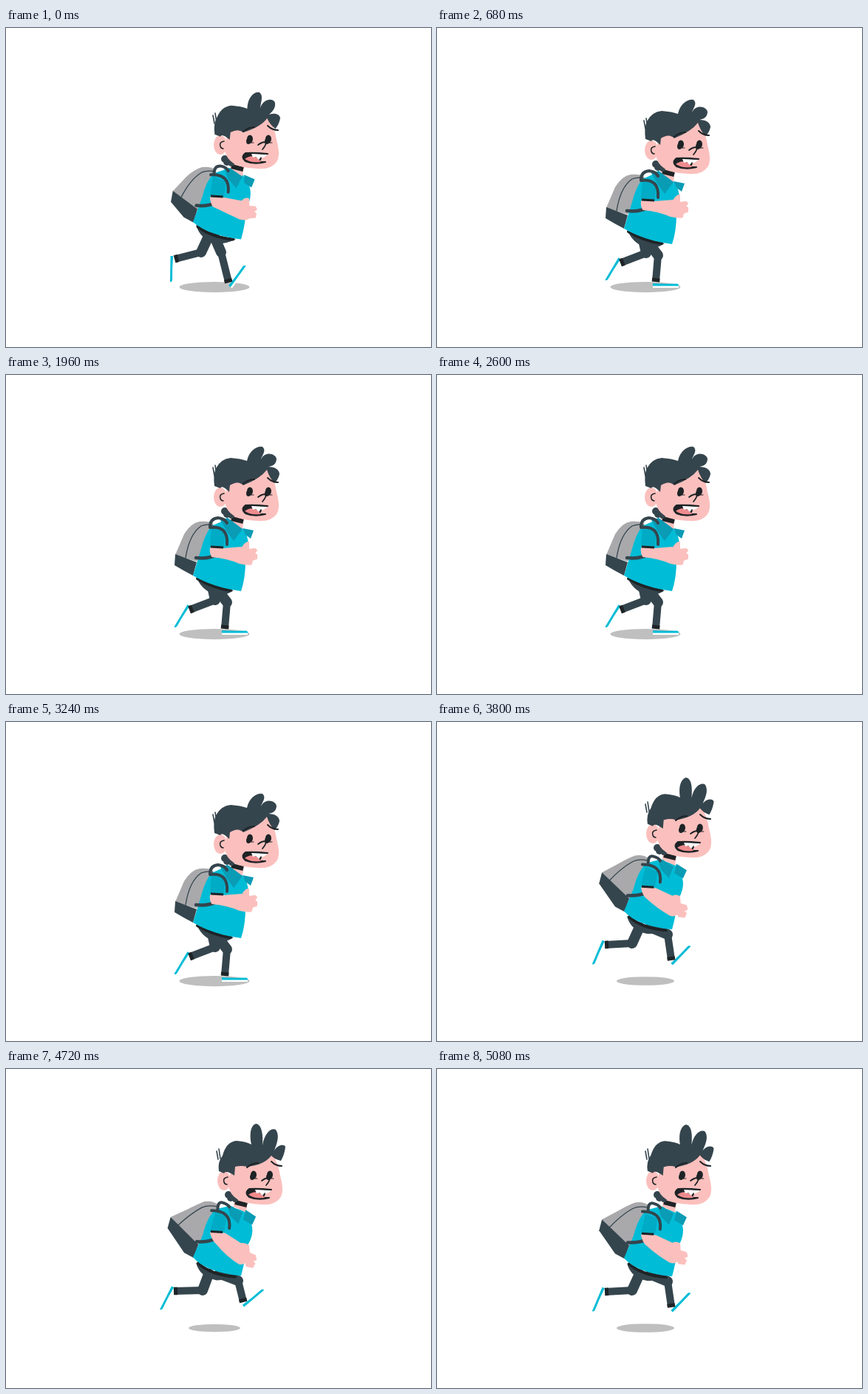
These frames come from a looping animation (575 by 431 pixels, 5120 ms). An HTML page with a canvas:

```html
<!DOCTYPE html>
<html lang="en">
<head>
<meta charset="utf-8">
<title>Running boy</title>
<style>
html, body { margin: 0; width: 100%; height: 100%; overflow: hidden; background: #fff; }
canvas { display: block; }
</style>
</head>
<body>
<canvas id="stage" width="575" height="431"></canvas>
<script>
const ctx = document.getElementById('stage').getContext('2d');
const FRAME = 40;
const DARK = '#35454d', BLACK = '#1e2326', SKIN = '#fbc0bd';
const TEAL = '#00bcd6', DEEP_TEAL = '#0a9bb5', GREY = '#a9a9ac';

// One stride, repeated for each foot:
// torso lift, arm swing, hair lift, head x, head y, shadow radius
const STRIDE = [
  [.55, .35, .35, 0, -7, 47.5],
  [0, 0, 0, 0, 0, 47.5],
  [-.08, .1, -.05, 5, 4, 47.5],
  [.25, .45, .4, 11, 2, 44],
  [.7, .85, .85, 14, -4, 38],
  [1, 1, 1, 8, -9, 34],
  [1.05, .9, 1, 5, -14, 35],
  [.97, .7, .85, 2, -14, 39]
];

// One leg through two strides: knee x, knee y, ankle x, ankle y, foot angle
const LEG = [
  [291, 303, 301, 343, -54], [299, 307, 296, 342, 0],
  [287, 311, 281, 342, 2], [275, 309, 262, 335, 40],
  [272, 304, 246, 316, 95], [270, 299, 233, 301, 119],
  [266, 299, 228, 300, 117], [264, 299, 228, 301, 113],
  [264, 303, 229, 312, 91], [283, 304, 249, 317, 121],
  [297, 303, 268, 318, 105], [308, 298, 291, 318, 60],
  [313, 291, 312, 311, 5], [314, 286, 320, 308, -33],
  [314, 286, 321, 314, -40], [312, 287, 317, 321, -46]
];

const mix = (a, b, k) => a + (b - a) * k;

// Blends two paths that share the same commands
function blend(low, high, k) {
  const ends = high.match(/[\d.]+/g);
  let i = 0;
  return low.replace(/[\d.]+/g, n => mix(+n, +ends[i++], k).toFixed(2));
}

function fill(color, path) {
  ctx.fillStyle = color;
  ctx.fill(new Path2D(path));
}

function line(color, width, path, cap = 'round') {
  ctx.strokeStyle = color;
  ctx.lineWidth = width;
  ctx.lineCap = cap;
  ctx.lineJoin = 'round';
  ctx.stroke(new Path2D(path));
}

function oval(color, x, y, rx, ry = rx) {
  ctx.fillStyle = color;
  ctx.beginPath();
  ctx.ellipse(x, y, rx, ry, 0, 0, 7);
  ctx.fill();
}

function drawLeg([kx, ky, ax, ay, angle], lift) {
  const hx = mix(278, kx, .3), hy = mix(288, 277, lift);
  const length = Math.hypot(ax - kx, ay - ky);
  const ux = (ax - kx) / length, uy = (ay - ky) / length;

  ctx.save();
  ctx.translate(ax, ay);
  ctx.rotate(angle * Math.PI / 180);
  fill('#fff', 'M-4 6H31V9H-4Z');
  fill(TEAL, 'M-4 3Q12 4 29 3.5Q32 5 31 6.5H-4Z');
  ctx.restore();

  line(DARK, 14, `M${hx} ${hy}L${kx} ${ky}`);
  line(DARK, 10, `M${kx} ${ky}L${ax} ${ay}`, 'butt');
  line(BLACK, 10.5, `M${ax - ux * 4} ${ay - uy * 4}L${ax + ux} ${ay + uy}`, 'butt');
}

function drawPack(k) {
  fill(GREY, blend(
    'M229 243L241 215Q250 200 262 198Q272 197 280 200L276 215L258 252Z',
    'M223 202L245 191Q258 184 268 180Q280 178 288 185L284 200L260 240Z', k));
  line(DARK, 1.3, blend('M243 247Q248 215 264 204Q272 201 280 203',
    'M232 214Q250 196 265 188Q274 184 286 187', k));
  fill(DARK, blend('M229 242L228 257L240 264L253 271L258 253Z',
    'M223 202L219 217L241 249L254 256L260 238Z', k));
}

function drawTorso(k) {
  fill(DARK, blend('M257 270Q280 286 308 291Q296 299 285 298Q262 290 257 270Z',
    'M257 262Q275 278 314 280Q300 286 285 286Q262 282 257 262Z', k));
  line(BLACK, 4, blend('M259 275Q280 288 304 291', 'M260 263Q278 279 310 281', k));
  fill(TEAL, blend(
    'M278 204Q269 215 264 235L253 271Q280 287 318 292Q324 275 324 250Q331 232 326 218L318 204L294 197Z',
    'M284 190Q272 200 266 225L253 255Q270 275 318 280Q323 262 326 240Q337 222 331 208L322 192L300 186Z', k));
}

function drawCollar(k) {
  fill(DEEP_TEAL, blend('M290 196L300 193L320 208L308 224L298 210Z',
    'M299 184L306 186L320 195L314 210L303 199Z', k));
  fill(DEEP_TEAL, blend('M320 207L335 210L331 221L324 216Z',
    'M324 191L338 200L333 211L321 204Z', k));
}

function drawStraps(k) {
  line(DARK, 4, blend('M276 205Q276 194 287 193Q296 194 299 200',
    'M286 190Q286 180 292 181Q300 183 302 187', k));
  line(DARK, 4, blend('M276 206Q301 203 299 229', 'M278 192Q305 192 302 216', k));
  line(DARK, 4.5, blend('M257 247Q275 249 286 242', 'M258 234Q272 235 284 230', k));
}

function drawArm(k) {
  const arm = blend(
    'M277 234Q276 240 279 245Q300 247 316 254Q328 257 332 255L333 250L339 248L339 243L336 241L339 237L337 235L328 236L328 226Q324 226 320 233L294 235Z',
    'M277 220Q280 229 284 233Q300 255 316 264Q320 265 322 260L325 268L333 270L336 265L332 261L338 260L337 254L329 250L328 240Q322 236 318 237L296 221Z', k);
  fill(SKIN, arm);
  line(SKIN, 2, arm);
  line(BLACK, 3, blend('M277 232L294 233', 'M277 218L293 219', k), 'butt');
}

function drawHead(hair, turn) {
  // Nape curls and ear
  oval(DARK, 296, 184, 5);
  oval(DARK, 299, 188, 5);
  oval(DARK, 305, 190, 4);
  oval(SKIN, 290, 165, 9, 13);
  fill(SKIN, 'M300 144L353 124Q364 142 366 158Q372 180 366 188Q358 199 340 197Q318 196 308 190Q297 183 296 170Z');
  line(BLACK, 1.6, 'M295 160Q288 161 290 167Q291 170 294 170');

  line(DARK, 1.6, 'M282 136L280 125M285 135L283 122');
  fill(DARK, blend(
    'M282 150Q280 135 284 126Q291 113 304 112Q318 113 326 116C329 101 341 95 347 97C353 102 346 109 345 114C350 102 366 106 366 114C365 123 358 123 355 124C364 124 370 128 370 134Q368 142 363 146Q356 138 353 128Q344 140 321 149Q314 142 303 149L302 158Q292 148 290 153Z',
    'M283 152Q281 140 288 131Q293 112 307 111Q320 112 327 116C323 96 329 88 334 88C341 90 343 102 342 117C345 100 354 93 360 96C366 104 361 116 358 124C363 116 371 115 373 119Q372 129 367 138Q358 136 354 131Q344 144 321 146Q314 144 305 146L304 158Q292 150 290 155Z', hair));

  for (const x of [330, 355 - turn * .6]) {
    oval(BLACK, x, 157, 4, 5.5);
    oval(BLACK, x - 2, 160, 3, 4);
    line(BLACK, 1, `M${x} 162H${x + 5}`);
  }
  line(BLACK, 2, 'M321 147Q328 141 336 141M354 139Q360 145 368 145');
  line(BLACK, 1.8, 'M341 165Q346 161 351 161Q353 164 347 171');

  // Mouth
  fill(BLACK, 'M354 177Q335 175 324 176Q317 181 324 187Q336 192 351 188L345 182Z');
  fill('#ee8b8d', 'M323 184Q332 177 341 183L345 188Q333 190 323 184Z');
  fill('#fff', 'M332 177L353 178L349 184L345 181L342 185L338 181L334 182Z');
  fill(SKIN, 'M354 179L351 187L344 187L346 183Z');
  line(BLACK, 2, 'M354 177Q335 175 324 176Q317 181 324 187Q336 192 351 188');
}

function draw(step) {
  const [lift, arm, hair, headX, headY, shadow] = STRIDE[step % 8];
  ctx.fillStyle = '#fff';
  ctx.fillRect(0, 0, 575, 431);
  oval('#bfbfbf', 282, 350, shadow, shadow * .15);

  drawLeg(LEG[(step + 8) % 16], lift);
  drawLeg(LEG[step % 16], lift);
  drawPack(lift);
  drawTorso(lift);

  ctx.save();
  ctx.translate(headX, headY);
  fill(SKIN, 'M304 186L322 192L320 208L303 200Z');
  line(BLACK, 6, 'M305 194L321 198', 'butt');
  ctx.restore();

  drawCollar(lift);
  fill('#00abc5', blend('M278 206L297 212L295 232L276 231Z',
    'M284 191L299 198L295 218L276 217Z', arm));
  drawStraps(lift);

  ctx.save();
  ctx.translate(headX, headY);
  drawHead(hair, headX);
  ctx.restore();

  drawArm(arm);
}

const start = performance.now();
function tick() {
  draw(Math.floor((performance.now() - start) / FRAME) % 16);
  requestAnimationFrame(tick);
}
tick();
</script>
</body>
</html>
```
